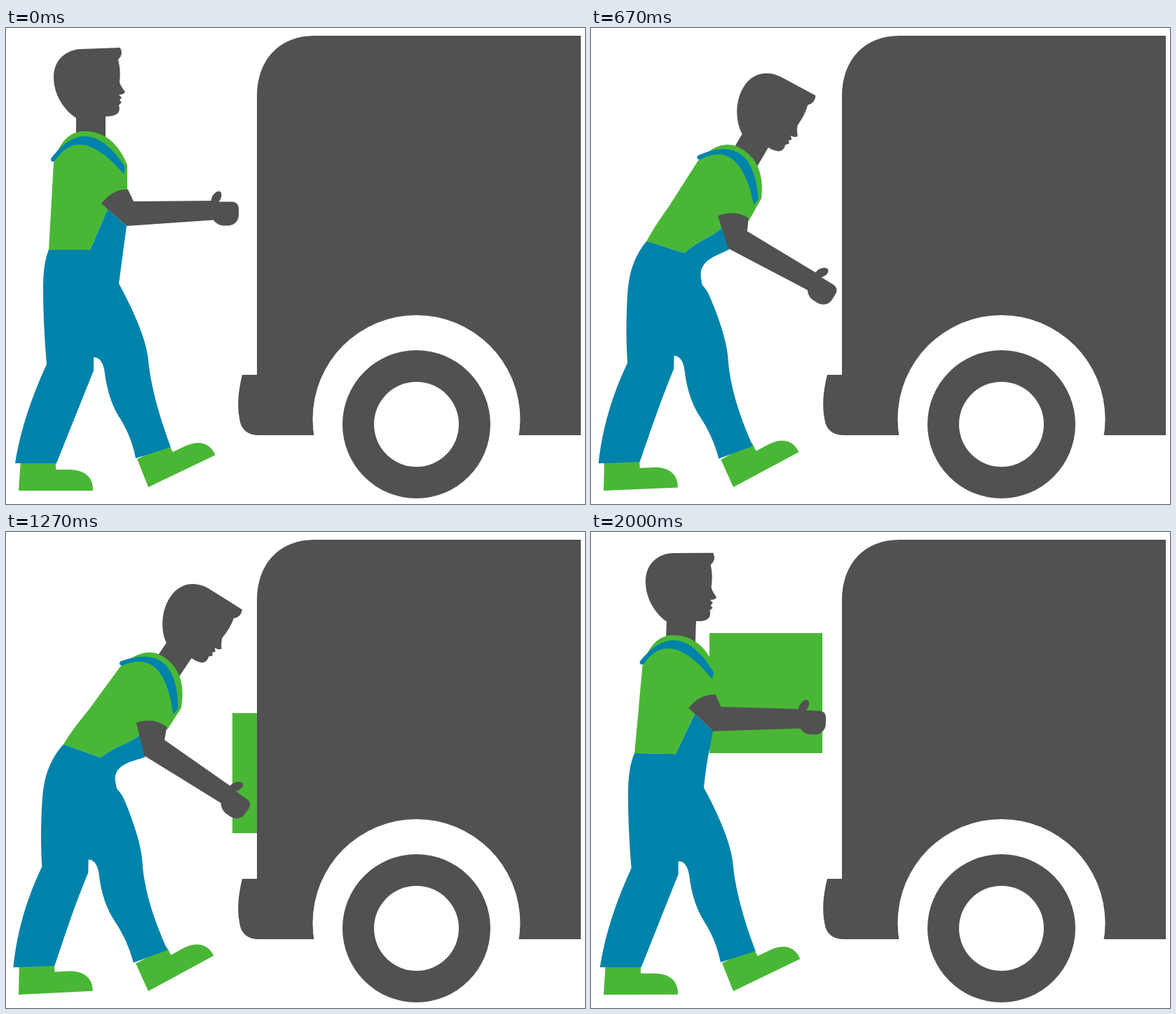
These frames come from a looping animation (826x678 px, 3980 ms). An HTML page with a canvas:

```html
<!DOCTYPE html>
<html lang="en">
<head>
<meta charset="utf-8">
<title>Unloading a van</title>
<style>
html, body { margin: 0; width: 100%; height: 100%; overflow: hidden; background: #fff; }
canvas { display: block; }
</style>
</head>
<body>
<canvas id="stage" width="826" height="678"></canvas>
<script>
const ctx = document.getElementById('stage').getContext('2d');
const DARK = '#515151', GREEN = '#49b735', BLUE = '#0083ab', WHITE = '#fff';
const LOOP = 3980, LAST = 60, HALF = 30;
const PEAK = 40.9, REST = 2, FULL = 38.8; // bend angles in degrees
const RAD = Math.PI / 180;
const SHOULDER = [176, 264];

const clamp = v => Math.min(1, Math.max(0, v));
const smooth = s => s * s * (3 - 2 * s);

function rotate(x, y, cx, cy, deg) {
  const c = Math.cos(deg * RAD), s = Math.sin(deg * RAD);
  x -= cx;
  y -= cy;
  return [cx + c * x - s * y, cy + s * x + c * y];
}

// An outline stored as fine steps, so that it can be bent like cloth.
class Outline {
  constructor(x, y) {
    this.points = [[x, y]];
  }
  quad(cx, cy, x, y) {
    const [ax, ay] = this.points.at(-1), steps = 24;
    for (let i = 1; i <= steps; i++) {
      const t = i / steps, u = 1 - t;
      this.points.push([
        u * u * ax + 2 * u * t * cx + t * t * x,
        u * u * ay + 2 * u * t * cy + t * t * y
      ]);
    }
    return this;
  }
  line(x, y) {
    const [ax, ay] = this.points.at(-1);
    return this.quad((ax + x) / 2, (ay + y) / 2, x, y);
  }
  fill(color, angle) {
    ctx.beginPath();
    for (const [x, y] of this.points) ctx.lineTo(...bend(x, y, angle));
    ctx.fillStyle = color;
    ctx.fill();
  }
}

const shirt = new Outline(61, 316).line(68, 192)
  .quad(80, 147, 112, 147).quad(153, 147, 173, 195)
  .line(173, 231).line(145, 258).line(120, 316);

const strap = new Outline(64, 186).quad(116, 117, 170, 198)
  .line(168, 208).quad(105, 135, 70, 189).quad(64, 193, 64, 186);

const pants = new Outline(61, 316).line(120, 316).line(145, 258).line(172, 282).line(161, 364)
  .quad(199, 434, 203, 473).quad(208, 525, 235, 597).line(185, 613)
  .quad(179, 582, 162, 555).quad(146, 530, 141, 492).quad(138, 469, 125, 469)
  .line(125, 488).line(72, 620).line(13, 620)
  .quad(23, 555, 58, 479).quad(53, 420, 53, 370).quad(53, 335, 61, 316);

const head = new Path2D(`M100 128 C84 118 68 96 68 70 C68 46 85 31 107 30 L163 28
  Q168 38 160 45 Q164 60 162 77 Q163 82 170 91 Q168 95 161 95 L165 99 L162 103
  L165 106 L161 110 Q166 126 142 126 V165 H100 Z`);
const shoe = new Path2D('M0 0 H106 C107 -19 94 -30 72 -30 H53 V-43 H3 Z');
const van = new Path2D(`M820 11 H440 C390 11 358 45 358 98 V494 H337
  Q328 530 333 556 Q336 580 361 580 H820 Z`);

// Stiff above the waist, turning less and less towards the hips;
// the belly folds in and the knees sway back.
function bend(x, y, angle) {
  const k = angle / FULL;
  const w = smooth(clamp((380 - y) / 113));
  const u = clamp((y - 365) / 255), knee = Math.sin(Math.PI * u);
  const cx = 101 + 15.5 * w, cy = 395 - 42.7 * w;
  if (x > cx) x -= (x - cx) * 1.4 * k * w * (1 - w);
  const [px, py] = rotate(x, y, cx, cy, 0.97 * w * angle);
  const heel = x < 130 ? 18 : 203;
  return [
    px - k * ((5.5 + 0.015 * x) * knee + 3 * u),
    py - k * (2.5 * knee + 0.045 * u ** 3 * (x - heel))
  ];
}

function bendAngle(n) {
  return n <= HALF
    ? PEAK * smooth(n / HALF)
    : PEAK + (REST - PEAK) * smooth((n - HALF) / HALF);
}

function disc(x, y, r, color) {
  ctx.beginPath();
  ctx.arc(x, y, r, 0, 2 * Math.PI);
  ctx.fillStyle = color;
  ctx.fill();
}

function drawBox(n) {
  if (n < HALF) return;
  const s = (n - HALF) / HALF;
  ctx.fillStyle = GREEN;
  ctx.fillRect(363 - 134 * s - 60 * s * s, 275 - 39.7 * s - 91.3 * s * s, 161, 171);
}

function drawVan() {
  ctx.fillStyle = DARK;
  ctx.fill(van);
  disc(585.5, 557, 148, WHITE);
  disc(585.5, 564.5, 105.5, DARK);
  disc(585.5, 564.5, 60.5, WHITE);
}

function drawHead(angle) {
  ctx.save();
  ctx.translate(115.5, 353);
  ctx.rotate(angle * RAD);
  ctx.translate(-115.5, -353);
  ctx.fillStyle = DARK;
  ctx.fill(head);
  ctx.restore();
}

function drawShoe(x, y, deg) {
  ctx.save();
  ctx.translate(x, y);
  ctx.rotate(deg * RAD);
  ctx.fillStyle = GREEN;
  ctx.fill(shoe);
  ctx.restore();
}

function drawArm(angle) {
  ctx.save();
  ctx.translate(...rotate(...SHOULDER, 124.3, 342.8, angle));
  ctx.rotate(1.04 * angle * RAD);
  ctx.scale(1 + 0.035 * angle / FULL, 1);
  ctx.translate(-SHOULDER[0], -SHOULDER[1]);
  ctx.fillStyle = DARK;
  ctx.beginPath();
  ctx.moveTo(136, 250);
  ctx.quadraticCurveTo(152, 229, 174, 230);
  ctx.lineTo(182, 247);
  ctx.lineTo(296, 246);
  ctx.lineTo(296, 273.5);
  ctx.lineTo(172, 282);
  ctx.fill();
  ctx.beginPath();
  ctx.roundRect(293, 247.5, 39, 34, [4, 9, 15, 18]);
  ctx.fill();
  ctx.beginPath();
  ctx.ellipse(300, 242, 6, 10.5, 0.55, 0, 2 * Math.PI);
  ctx.fill();
  ctx.restore();
}

function drawMan(angle) {
  const tilt = -3.2 * angle / FULL;
  drawHead(angle);
  drawShoe(18, 659, tilt);
  drawShoe(203, 654, tilt - 25.6);
  shirt.fill(GREEN, angle);
  pants.fill(BLUE, angle);
  strap.fill(BLUE, angle);
  drawArm(angle);
}

function draw(now) {
  // 30 steps a second, then a long hold on the last pose
  const n = Math.min(LAST, Math.floor((now % LOOP) * 0.03 + 0.11));
  ctx.fillStyle = WHITE;
  ctx.fillRect(0, 0, 826, 678);
  drawBox(n);
  drawVan();
  drawMan(bendAngle(n));
}

const start = performance.now();
function tick() {
  draw(performance.now() - start);
  requestAnimationFrame(tick);
}
tick();
</script>
</body>
</html>
```
